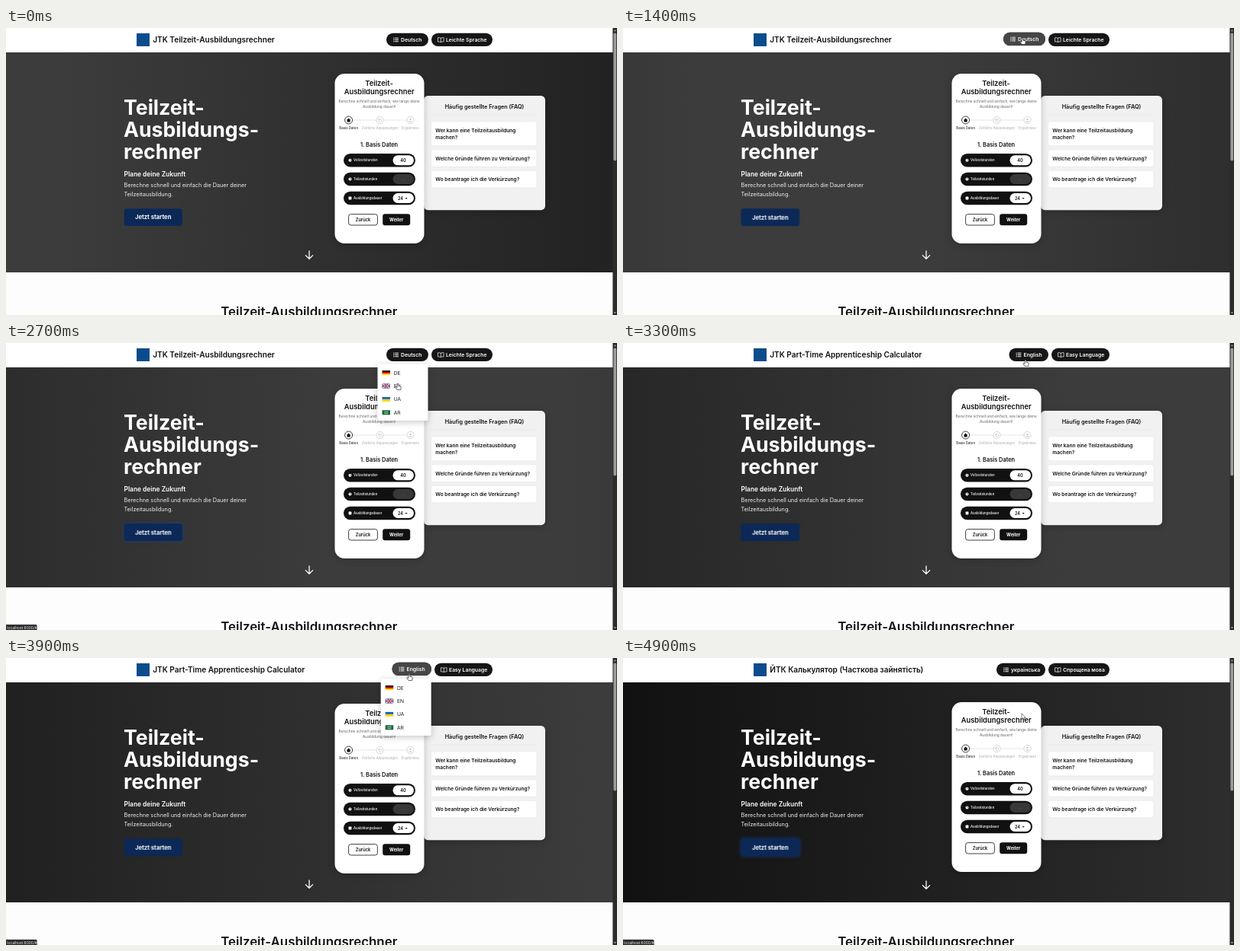
Recreate the animation shown at these times as an HTML page. Size 800 by 377 pixels, loop 5000 ms.

```html
<!DOCTYPE html>
<html lang="de">
<head>
<meta charset="utf-8">
<title>Teilzeit-Ausbildungsrechner</title>
<style>
html, body { margin: 0; width: 100%; height: 100%; overflow: hidden; background: #fcfcfc; }
svg { display: block; }
#stage { width: 100%; height: 100%; }
text { font-family: Inter, "Open Sans", sans-serif; }
#cta { transform-box: fill-box; transform-origin: center; }
#glow { filter: blur(2px); }
.shadow { filter: drop-shadow(0 2px 4px rgba(0, 0, 0, .22)); }
</style>
</head>
<body>
<svg id="stage" viewBox="0 0 800 377">
  <defs>
    <linearGradient id="sheen">
      <stop offset="0" stop-color="#0c0c0c"/>
      <stop offset=".447" stop-color="#3c3c3c"/>
      <stop offset=".553" stop-color="#3c3c3c"/>
      <stop offset="1" stop-color="#0c0c0c"/>
    </linearGradient>
  </defs>
  <rect width="800" height="377" fill="#fdfdfd"/>
  <rect width="795" height="32" fill="#fff"/>
  <svg y="32" width="795" height="289">
    <rect id="band" x="-1500" width="3000" height="289" fill="url(#sheen)"/>
  </svg>
  <g id="page"></g>
  <g id="phone"></g>
  <g id="header"></g>
  <g id="chrome"></g>
  <g id="pointer">
    <path id="hand" d="M-.9.8Q0-.6.9.8V3.2L3.2 3.7Q4.4 4 4.2 5.2L3.6 8.6H-.9L-3 5.4Q-3.2 4.2-2.1 4.4L-.9 5.4Z"
      fill="#fff" stroke="#222" stroke-width=".7" stroke-linejoin="round"/>
    <path id="arrow" d="M0 0V7.4L1.8 5.8 3 8.4 4.1 7.9 3 5.4H5.3Z" fill="#fff" stroke="#333" stroke-width=".6"/>
  </g>
</svg>
<script>
const LOOP = 5000;
const INK = '#111';
const $ = id => document.getElementById(id);

const text = (x, y, size, weight, str, fill = INK, anchor = 'start') =>
  `<text x="${x}" y="${y}" font-size="${size}" font-weight="${weight}" fill="${fill}" text-anchor="${anchor}">${str}</text>`;
const mid = (x, y, size, weight, str, fill) => text(x, y, size, weight, str, fill, 'middle');
const box = (x, y, w, h, r, fill, extra = '') =>
  `<rect x="${x}" y="${y}" width="${w}" height="${h}" rx="${r}" fill="${fill}" ${extra}/>`;
const line = (d, stroke, width = .7) =>
  `<path d="${d}" fill="none" stroke="${stroke}" stroke-width="${width}" stroke-linecap="round" stroke-linejoin="round"/>`;

// Hero copy, question panel and the heading below the fold
const card = (y, h) => box(556.5, y, 138.5, h, 3, '#fff', 'stroke="#e4e4e4" stroke-width=".6"');
const ask = (y, str) => text(562.3, y, 6.6, 600, str);
$('page').innerHTML =
  ['Teilzeit-', 'Ausbildungs-', 'rechner'].map((s, i) => text(154, 113.6 + i * 29.4, 26.7, 700, s, '#fff')).join('') +
  text(154.5, 194.6, 8.4, 600, 'Plane deine Zukunft', '#fff') +
  text(154.5, 209.4, 7.27, 400, 'Berechne schnell und einfach die Dauer deiner', '#eee') +
  text(154.5, 221.4, 7.27, 400, 'Teilzeitausbildung.', '#eee') +
  `<g id="cta">${box(154, 236.5, 78, 24.5, 4, '#1c4b9a', 'id="glow"')}
   ${box(154.7, 237.2, 76, 22.7, 3, '#0b2857')}${mid(192.7, 251.4, 7.6, 700, 'Jetzt starten', '#fff')}</g>` +
  `<g id="down">${line('M397 293V303M392.3 298.6L397 303.3 401.7 298.6', '#fff', 1.3)}</g>` +
  `<g class="shadow">${box(547, 89.1, 159, 150.1, 5.5, '#f1f1f1')}</g>` +
  mid(626.5, 106, 7.3, 600, 'Häufig gestellte Fragen (FAQ)') +
  line('M556 114H695', '#e4e4e4', .6) +
  card(122.8, 32) + ask(136.6, 'Wer kann eine Teilzeitausbildung') + ask(145.8, 'machen?') +
  card(159.8, 22.5) + ask(173.6, 'Welche Gründe führen zu Verkürzung?') +
  card(187.3, 22.5) + ask(201, 'Wo beantrage ich die Verkürzung?') +
  mid(396.8, 378.8, 16.9, 600, 'Teilzeit-Ausbildungsrechner');

// Phone mock-up
const field = (y, label, icon) =>
  box(442, y - 8.8, 94, 17.6, 8.8, INK) + icon + text(455, y + 1.6, 4.3, 500, label, '#fff');
const dot = y => `<circle cx="450.5" cy="${y}" r="2" fill="#fff"/>` + line(`M450.5 ${y - 1}V${y}H451.3`, INK, .5);
const ring = (x, r, color) => `<circle cx="${x}" cy="121" r="${r}" fill="#fff" stroke="${color}" stroke-width=".8"/>`;
$('phone').innerHTML =
  `<g class="shadow">${box(430.5, 60, 117, 223, 12.5, '#fff')}</g>` +
  mid(488.5, 76, 9.4, 600, 'Teilzeit-') +
  mid(488.7, 87.3, 9.4, 600, 'Ausbildungsrechner') +
  mid(488.7, 97.7, 4.85, 400, 'Berechne schnell und einfach, wie lange deine', '#666') +
  mid(488.7, 104.5, 4.85, 400, 'Ausbildung dauert!', '#666') +
  line('M454 121H525', '#d5d5d5', .6) +
  ring(448.6, 5, INK) + ring(489.5, 4.6, '#ccc') + ring(529.5, 4.6, '#ccc') +
  `<path d="M445.8 121.2L448.6 118.5 451.4 121.2H450.6V123.4H446.6V121.2Z" fill="${INK}"/>` +
  line('M487.8 119.4V121H489.4M488 120.6A2 2 0 1 1 488.2 122.4', '#bbb', .6) +
  `<circle cx="529.5" cy="119.8" r="1.1" fill="#bbb"/>` + line('M527.8 123H531.2', '#bbb', 1) +
  mid(448.7, 133.2, 4.4, 500, 'Basis Daten', '#333') +
  mid(489.5, 133.2, 4.4, 400, 'Zeitliche Anpassungen', '#aaa') +
  mid(529.5, 133.2, 4.4, 400, 'Ergebnisse', '#aaa') +
  mid(488.5, 156.2, 7.4, 600, '1. Basis Daten') +
  field(173.8, 'Vollzeitstunden', dot(173.8)) + box(506.5, 167.3, 27.5, 13, 6.5, '#fff') + mid(520, 175.8, 5.6, 600, '40') +
  field(198.5, 'Teilzeitstunden', dot(198.5)) + box(506.5, 192, 27.5, 13, 6.5, '#383838') + mid(520, 199.7, 5, 500, '....', '#777') +
  field(223.5, 'Ausbildungsdauer', box(448.6, 221.6, 3.8, 3.8, .6, '#fff')) + box(506.5, 217, 27.5, 13, 6.5, '#fff') +
  mid(516.5, 225.5, 5.6, 600, '24') + `<path d="M522.5 222.9H525.7L524.1 224.7Z" fill="${INK}"/>` +
  box(448.6, 244.6, 37.8, 14.4, 3, '#fff', `stroke="${INK}" stroke-width=".8"`) + mid(467.5, 253.6, 5.7, 600, 'Zurück') +
  box(493.2, 244.3, 36, 15, 3, INK) + mid(511.2, 253.6, 5.7, 700, 'Weiter', '#fff');

// Header in three languages
const LANGS = [
  { id: 'de', title: 'JTK Teilzeit-Ausbildungsrechner', name: 'Deutsch', easy: 'Leichte Sprache', x: 498, x2: 557 },
  { id: 'en', title: 'JTK Part-Time Apprenticeship Calculator', name: 'English', easy: 'Easy Language', x: 505.5, x2: 561 },
  { id: 'uk', title: 'ЙТК Калькулятор (Часткова зайнятість)', name: 'українська', easy: 'Спрощена мова', x: 489, x2: 557 }
];
const listIcon = x => [13.3, 15.5, 17.7].map(y =>
  line(`M${x} ${y}H${x + .6}M${x + 2.2} ${y}H${x + 6}`, '#fff', 1.1)).join('');
const bookIcon = x => line(`M${x + 3.8} 13.3Q${x + 2} 12.4 ${x} 12.8V18Q${x + 2} 17.6 ${x + 3.8} 18.5` +
  `Q${x + 5.6} 17.6 ${x + 7.6} 18V12.8Q${x + 5.6} 12.4 ${x + 3.8} 13.3V18.5`, '#fff', .7);
const pill = (x, end, fill, extra) => box(x, 6.7, end - x, 17.3, 8.65, fill, extra);
const header = l => `<g id="${l.id}">` +
  text(192.3, 19.1, 10.05, 600, l.title) +
  `<g id="${l.id}Button">` +
  pill(l.x, l.x2 - 4, '#161616') + pill(l.x, l.x2 - 4, '#464646', `id="${l.id}Hover" opacity="0"`) +
  listIcon(l.x + 9.5) + text(l.x + 19, 17.9, 6.85, 600, l.name, '#fff') + '</g>' +
  pill(l.x2, 637, '#161616') + bookIcon(l.x2 + 8.5) + text(l.x2 + 19, 17.9, 6.85, 600, l.easy, '#fff') + '</g>';

// Language menu
const stripes = (y, colors) => colors.map((c, i) =>
  box(492.5, y - 3 + i * 6 / colors.length, 10.5, 6 / colors.length, 0, c)).join('');
const cross = (y, c, w) => `<path d="M492.5 ${y}H503M497.75 ${y - 3}V${y + 3}" stroke="${c}" stroke-width="${w}"/>`;
const diag = y => `<path d="M492.5 ${y - 3}L503 ${y + 3}M492.5 ${y + 3}L503 ${y - 3}" stroke="#fff" stroke-width="1"/>`;
const rows = [
  ['DE', y => stripes(y, ['#111', '#d00', '#fc0'])],
  ['EN', y => stripes(y, ['#1c2f72']) + diag(y) + cross(y, '#fff', 2) + cross(y, '#c8102e', 1.1)],
  ['UA', y => stripes(y, ['#1463c0', '#ffd500'])],
  ['AR', y => stripes(y, ['#17693b']) + line(`M495.5 ${y - .8}H500M495.8 ${y + 1.2}H499.7`, '#fff', .6)]
];
const menu = (id, dx) => `<g id="${id}" opacity="0"><g transform="translate(${dx} 0)">` +
  `<g class="shadow">${box(486.5, 27.5, 66, 74.5, 2, '#fff')}</g>` +
  rows.map(([code, flag], i) => {
    const y = 39.1 + i * 17.4;
    return flag(y) + text(507.7, y + 2.4, 6.7, 400, code, '#222');
  }).join('') + '</g></g>';
$('header').innerHTML = box(171, 7, 17, 17, 0, '#0b4c8c') +
  LANGS.map(header).join('') + menu('menuA', 0) + menu('menuB', 4.2);

// Scrollbar and status line
$('chrome').innerHTML =
  box(794.4, 0, 6, 377, 0, '#2b2b2b') + box(795.4, 6.5, 3.8, 168, 1.9, '#9c9c9c') +
  '<path d="M795.8 4.2L797.4 2 799 4.2ZM795.8 373L797.4 375.2 799 373Z" fill="#9c9c9c"/>' +
  `<g id="status" opacity="0">${box(-3, 370, 43.5, 10, 1.5, '#2a2a2a', 'stroke="#555" stroke-width=".5"')}` +
  text(1.3, 375.6, 4.9, 400, 'localhost:8000/#', '#eee') + '</g>';

// Motion: tables of [time, value]
const play = (el, frames, duration = LOOP) => el.animate(frames, { duration, iterations: Infinity });
const move = (id, steps, easing = 'linear') => play($(id), steps.map(([t, x, y]) =>
  ({ offset: t / LOOP, transform: `translate(${x}px, ${y}px)`, easing })));
const fade = (id, steps, easing = 'linear') => play($(id), steps.map(([t, opacity]) =>
  ({ offset: t / LOOP, opacity, easing })));
// Hidden except inside the given spans
const show = (id, ...spans) => {
  const steps = spans.flatMap(([a, b]) => [[a, 1], [b, 0]]);
  if (steps[0][0] > 0) steps.unshift([0, 0]);
  if (steps[steps.length - 1][0] < LOOP) steps.push([LOOP, 0]);
  fade(id, steps, 'steps(1, end)');
};
// A hovered language button brightens and lifts
const hover = (lang, from, to) => {
  const steps = [[0, 0], [from, 0], [from + 130, 1], [to, 1], [to + 150, 0], [LOOP, 0]];
  fade(lang + 'Hover', steps);
  move(lang + 'Button', steps.map(([t, k]) => [t, 0, -.9 * k]));
};

move('band', [[0, -80, 0], [700, 80, 0], [1400, 250, 0], [2100, 420, 0], [3300, 740, 0],
  [3900, 920, 0], [4900, 1350, 0], [5000, 1390, 0]]);
move('phone', [[0, 0, 0], [4850, 0, 0], [4900, 0, -2], [5000, 0, -2]]);
move('down', [[0, 0, 0], [1700, 0, 0], [2100, 0, -2], [2500, 0, 0], [3700, 0, 0],
  [4100, 0, -2], [4500, 0, 0], [5000, 0, 0]], 'ease-in-out');
move('pointer', [[0, 250, 385], [200, 255, 360], [600, 345, 17], [700, 346, 16], [850, 352, 16],
  [1300, 520, 14], [1400, 523, 13], [1800, 522, 17], [2150, 522, 17], [2500, 513, 53], [2850, 513, 53],
  [3250, 527, 22], [3900, 528, 21], [4200, 523, 53], [4500, 522, 72], [5000, 522, 73]], 'ease-in-out');

play($('cta'), [{ transform: 'scale(1)' }, { transform: 'scale(1.01)' }, { transform: 'scale(1)' }], 2000);
play($('glow'), [{ opacity: 0 }, { opacity: .15, offset: .2 }, { opacity: .55, offset: .42 },
  { opacity: .05, offset: .65 }, { opacity: 0 }], 2000);

show('de', [0, 2750]);
show('en', [2750, 4850]);
show('uk', [4850, LOOP]);
show('menuA', [1750, 2750]);
show('menuB', [3650, 4850]);
show('status', [1650, 3150], [3650, LOOP]);
show('hand', [560, 850], [1250, 2750], [3200, 4850]);
show('arrow', [150, 560], [850, 1250], [2750, 3200], [4850, LOOP]);
hover('de', 1250, 2250);
hover('en', 3320, 4000);
</script>
</body>
</html>
```
